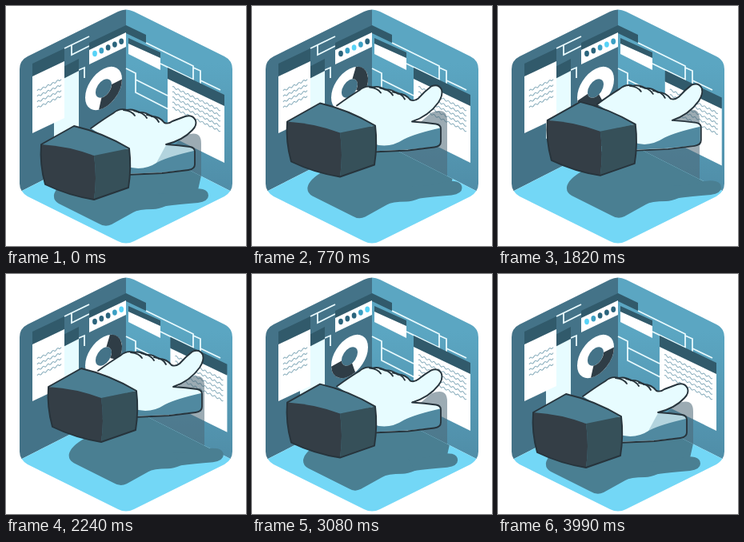
These frames come from a looping animation (300 px wide and 300 px high, 4060 ms). An HTML page:

```html
<!DOCTYPE html>
<html lang="en">
<head>
<meta charset="utf-8">
<title>Hand gesture in a data cube</title>
<style>
  html, body { margin: 0; width: 100%; height: 100%; overflow: hidden; background: #fff; }
  svg { display: block; width: 100%; height: 100%; }
  .dark { fill: #315a6b; }
  .paper { fill: #fff; }
  .wire { fill: none; stroke: #e9fafe; stroke-width: 1.8; }
  .script { fill: none; stroke: #8fb2c0; stroke-width: 1.1; }
  .ink { stroke: #27343c; stroke-width: 1.9; stroke-linejoin: round; stroke-linecap: round; }
  .skin { fill: #e7fcff; }
  .slate { fill: #5089a0; }
  .shadow { fill: #4a7f92; }
</style>
</head>
<body>
<svg viewBox="0 0 300 300" aria-label="A hand moving in front of floating windows">
  <defs>
    <clipPath id="cube"><path d="M140 7Q150 2 160 7L273 63Q283 68 283 79V222Q283 232 273 238L160 294Q150 299 140 294L27 238Q17 232 17 222V79Q17 68 27 63Z"/></clipPath>
    <clipPath id="floor"><path d="M150 165L300 241V300H0V241Z"/></clipPath>
    <clipPath id="rightWall"><path d="M150 0H300V241L150 165Z"/></clipPath>
    <linearGradient id="wallTone" x2="0" y2="1">
      <stop offset=".3" stop-color="#5ba6c2"/>
      <stop offset="1" stop-color="#4f8ca6"/>
    </linearGradient>
  </defs>

  <g clip-path="url(#cube)">
    <path fill="#447388" d="M0 0H150V165L0 241Z"/>
    <path fill="url(#wallTone)" d="M150 0H300V241L150 165Z"/>
    <path fill="#73d7f6" d="M150 165L300 241V300H0V241Z"/>

    <g class="wire">
      <path d="M73 53L104 38M82 49V61L104 50M91 80L98 77V90"/>
      <path d="M150 78L162 84V108L205 130M162 92L202 112M175 46L234 75V92L193 72M234 77L243 81V99M243 93L268 105"/>
    </g>

    <path class="dark" d="M104 46L150 24V34L104 56Z"/>
    <path class="paper" d="M104 55L150 33V51L104 73Z"/>
    <path class="dark" d="M150 24L175 36V46L150 34Z"/>
    <path class="dark" d="M153 40L193 58V66L153 48Z"/>
    <path class="paper" d="M153 47L193 65V80L153 60Z"/>
    <g id="dots"></g>

    <path class="skin" d="M60 96L91 80V151L60 166Z"/>
    <path class="dark" d="M60 82L91 66V81L60 97Z"/>
    <path class="paper" d="M33 86L73 67V140L33 159Z"/>
    <path class="dark" d="M33 72L73 53V69L33 88Z"/>
    <g id="leftScript" class="script"></g>

    <g id="rightWindow">
      <path class="paper" d="M202 90L273 124V196L202 161Z"/>
      <path class="dark" d="M202 77L273 111V125L202 91Z"/>
      <g id="rightScript" class="script"></g>
    </g>

    <g fill="none" stroke-width="13" transform="matrix(1 -.5 0 1.07 122 103)">
      <circle r="16.5" stroke="#fff"/>
      <path id="slice" stroke="#2f3d46" d="M16.5 0A16.5 16.5 0 0 1 -4.3 15.9"/>
    </g>

    <g clip-path="url(#rightWall)">
      <path id="wallShadow" fill="#4c6676" fill-opacity=".55"/>
    </g>
    <g clip-path="url(#floor)">
      <path id="floorShadow" class="shadow" d="M60 236Q62 226 80 216L110 185L150 150L244 190V212L240 230L200 250Q190 254 184 254Q165 254 159 258L132 273Q124 277 116 272L66 247Q59 243 60 236Z"/>
    </g>
    <path id="fingerShadow" class="shadow" d="M190 234Q210 235 224 231Q236 227 246 229Q253 231 253 237Q253 244 240 246Q215 248 200 250Z"/>
  </g>

  <g id="hand">
    <path id="palm" class="skin"/>
    <path class="slate" d="M150 170Q170 178 190 165Q204 158 235 151V174L195 178L150 180Z"/>
    <path id="thumbShade" class="slate"/>
    <path id="outline" class="ink" fill="none"/>
    <path class="ink" fill="none" d="M147 100Q157 101 161 107M160 101Q172 103 176 110M176 106Q187 107 191 115"/>
    <path fill="#4b7e92" d="M85 120L44 143L110 157L154 148Q120 128 85 120Z"/>
    <path fill="#343e46" d="M44 143Q78 145 110 157Q114 185 110 212Q78 207 49 193Q42 168 44 143Z"/>
    <path fill="#365059" d="M110 157L154 148Q157 172 153 197L110 212Q114 185 110 157Z"/>
    <path class="ink" fill="none" d="M85 120L44 143Q42 168 49 193Q78 207 110 212L153 197Q157 172 154 148Q120 128 85 120Z"/>
  </g>
</svg>

<script>
const FRAME = 70, LOOP = 4060;
const get = id => document.getElementById(id);
const range = n => [...Array(n).keys()];
const move = (id, x, y) => get(id).setAttribute("transform", `translate(${x} ${y})`);

// Eased interpolation between [time, value] stops.
function track(stops, t) {
  const next = stops.findIndex(([time]) => time > t);
  if (next < 0) return stops[stops.length - 1][1];
  if (next === 0) return stops[0][1];
  const [t0, a] = stops[next - 1], [t1, b] = stops[next];
  return a + (b - a) * (1 - Math.cos(Math.PI * (t - t0) / (t1 - t0))) / 2;
}

const moveX = [[770, 0], [1750, 18], [2730, 0]];
const moveY = [[0, 30], [980, -2], [1330, -2], [1750, 0], [2170, -2], [2520, -2], [3500, 30]];
const fingerDrop = [[0, 10], [770, 0], [2730, 0], [3500, 10]];
const thumbDark = [[0, 1], [420, 0], [3080, 0], [3500, 1]];
const sliceTurn = [[0, 0], [770, -70], [1260, -70], [1750, 72], [2240, -70], [3080, 72], [3600, 0]];
const litDot = [[0, 0], [1260, 3], [3080, 4], [3800, 0]];
const dotColors = ["#57d3f7", "#3b9fc3", "#2b647c"];

function wave(x, y, width, slope) {
  let d = `M${x} ${y}`;
  for (let i = 0; i < width; i += 6)
    d += `q1.5 ${slope * 1.5 - 2} 3 ${slope * 3}t3 ${slope * 3}`;
  return `<path d="${d}"/>`;
}
get("leftScript").innerHTML = range(4).map(i => wave(39, 106 + i * 7, 30, -.48)).join("");
get("rightScript").innerHTML = range(5).map(i => wave(208, 101 + i * 6.5, 58, .49)).join("");
get("dots").innerHTML = range(5).map(i =>
  `<ellipse cx="${111 + i * 8.3}" cy="${59.5 - i * 3.8}" rx="2.9" ry="3.7"/>`).join("");
const dots = [...get("dots").children];

function draw(t) {
  const x = track(moveX, t), y = track(moveY, t), drop = track(fingerDrop, t);
  const lift = (30 - y) / 3;
  move("hand", x, y);
  for (const id of ["floorShadow", "fingerShadow"]) move(id, x * .9 + lift, -lift);
  move("rightWindow", x * .38, x * .2);

  const upper = `M106 123Q121 112 134 104Q142 97 151 100Q159 98 166 103Q174 102 182 108Q192 108 198 116Q203 118 208 114
    Q216 ${105 + drop * .6} 224 ${99 + drop * .9}Q233 ${95 + drop} 237 ${103 + drop}
    Q239 ${110 + drop * .9} 233 ${119 + drop * .6}Q221 ${136 + drop * .2} 200 143`;
  const lower = "Q216 144 230 146Q236 147 236 152V168Q236 174 228 175L195 179L150 181";
  get("palm").setAttribute("d", upper + lower + "V150Z");
  get("outline").setAttribute("d", upper + lower);
  get("thumbShade").setAttribute("d", "M200 144" + "Q216 144 230 146Q236 147 236 152V172L195 178L188 166Z");
  get("thumbShade").setAttribute("opacity", track(thumbDark, t) * .35);

  const edge = 244 + x * .45;
  get("wallShadow").setAttribute("d",
    `M180 ${170 + y}L${edge - 20} ${132 + y}Q${edge} ${124 + y} ${edge} ${142 + y}V241H150V165Z`);

  get("slice").setAttribute("transform", `rotate(${track(sliceTurn, t)})`);
  const lit = Math.round(track(litDot, t));
  dots.forEach((dot, i) => dot.setAttribute("fill", dotColors[Math.min(2, Math.abs(i - lit))]));
}

function tick() {
  draw(Math.floor(performance.now() % LOOP / FRAME) * FRAME);
  requestAnimationFrame(tick);
}
draw(0);
requestAnimationFrame(tick);
</script>
</body>
</html>
```
